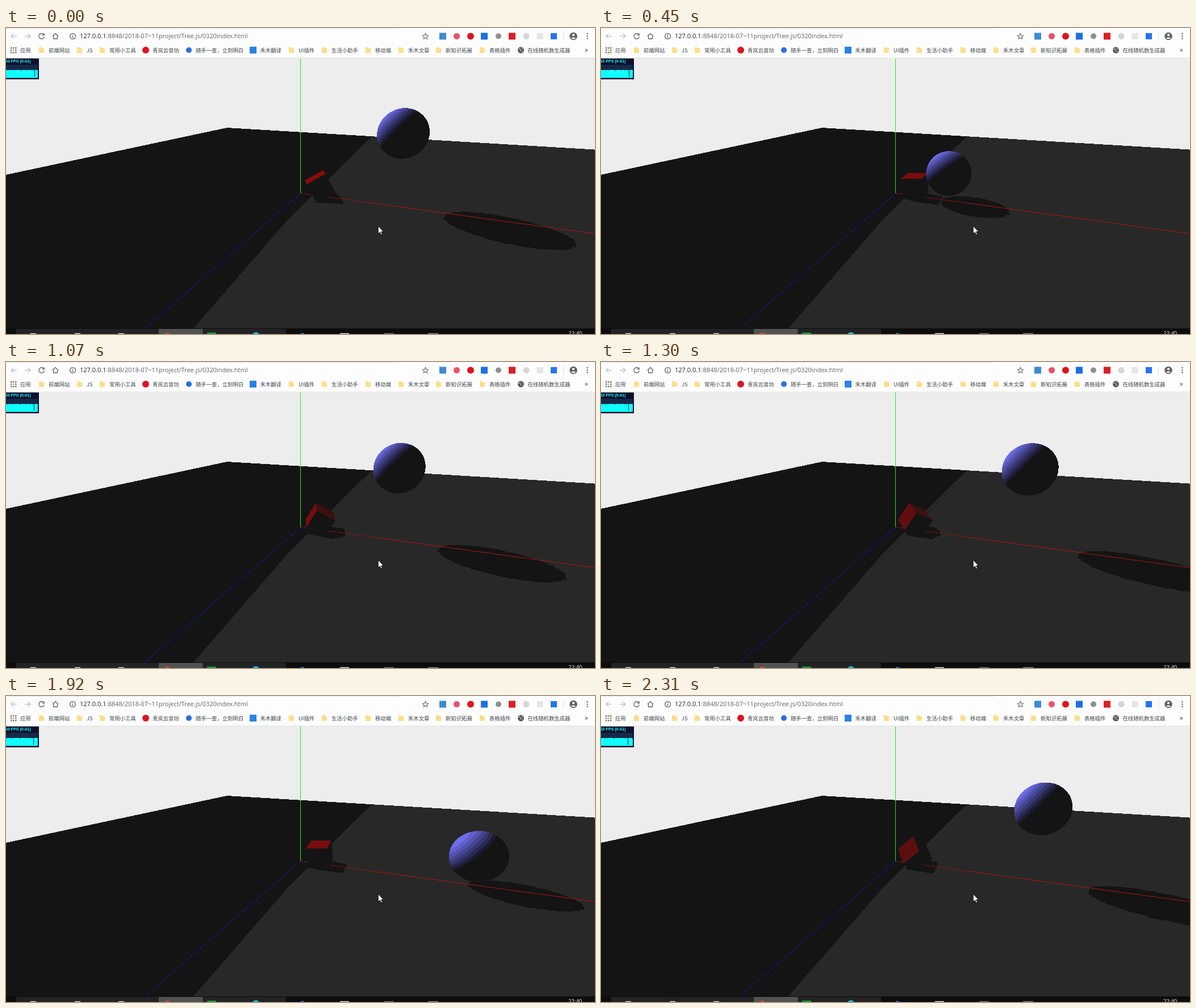
Animation of 1037 by 540 pixels, one loop 2380 ms. Source, as an HTML page:

```html
<!DOCTYPE html>
<html lang="zh">
<head>
<meta charset="utf-8">
<title>Bouncing sphere</title>
<style>
html, body { margin: 0; width: 100%; height: 100%; overflow: hidden; background: #ededed; }
svg { display: block; width: 1037px; height: 540px; }
text { white-space: pre; }
.url { font: 11px "Open Sans", "Noto Sans", sans-serif; fill: #5f6368; }
.mark { font: 9.35px "Noto Sans CJK SC", "Noto Sans CJK", "Noto Sans", sans-serif; fill: #3c4043; }
.fps { font: bold 7.2px "Liberation Sans", Arial, sans-serif; fill: #0ff; }
.clock { font: 9.5px "Open Sans", sans-serif; fill: #fff; }
.line { fill: none; stroke: #5f6368; stroke-width: 1.3; }
</style>
</head>
<body>
<svg id="stage" viewBox="0 0 1037 540">
  <rect width="1037" height="540" fill="#ededed"/>
  <g shape-rendering="crispEdges">
    <path d="M0 259L389 176L1037 214.6V540H0Z" fill="#141414"/>
    <path d="M644 191.2L541 293L499 335L330 530V540H1037V214.6Z" fill="#282828"/>
    <g id="shadows" fill="#141414"></g>
    <path d="M518.5 53V292" stroke="#14f014"/>
    <path d="M518.5 292L245 530" stroke="#15158c"/>
    <path d="M518.5 291.5L640 308.3" stroke="#a01010" stroke-dasharray="5 1.5"/>
    <path d="M640 308.3L1037 363" stroke="#b01212"/>
    <g id="cube"></g>
    <g id="ball"></g>
  </g>
  <path d="M655.3 349.5V363L658.4 360.2L660.6 365L662.6 364.1L660.5 359.4H664.6Z" fill="#fff" stroke="#000" stroke-width=".8"/>
  <g id="stats">
    <rect y="53" width="58" height="37.5" fill="#10102c"/>
    <rect y="65" width="56" height="23" fill="#15294a"/>
    <path id="graph" fill="#1ff"/>
    <text class="fps" x="-1.5" y="60.5">60 FPS (0-61)</text>
  </g>
  <g id="browser">
    <rect width="1037" height="53.5" fill="#fdfdfd"/>
    <rect width="692" height="1" fill="#e3e4e6"/>
    <path d="M0 53H1037" stroke="#dcdcdc"/>
    <path class="line" d="M19 14.5H9M13.5 10L9 14.5L13.5 19M33 14.5H43M38.5 10L43 14.5L38.5 19" style="stroke:#bfc1c4"/>
    <path class="line" d="M66.3 11.5A4.7 4.7 0 1 0 67.2 15.5M67.2 9.5V12.8H63.7"/>
    <path class="line" d="M82 14.5L87 9.7L92 14.5M83.5 14V19H90.5V14"/>
    <circle class="line" cx="117.5" cy="14.5" r="4.9"/>
    <path class="line" d="M117.5 13.5V17.5M117.5 11.3V12.5"/>
    <text class="url" x="130" y="18.3"><tspan fill="#202124">127.0.0.1</tspan>:8848/2018-07~11project/Tree.js/0320index.html</text>
    <path class="line" d="M738.5 9.5L740 13L743.6 13.3L740.9 15.7L741.7 19.2L738.5 17.3L735.3 19.2L736.1 15.7L733.4 13.3L737 13Z" style="stroke-width:1.1"/>
    <path d="M981.5 8V21" stroke="#dadce0"/>
    <circle cx="999" cy="14.5" r="6.8" fill="#5f6368"/>
    <circle cx="999" cy="12.4" r="2.1" fill="#fff"/>
    <path d="M994.8 18A5 3 0 0 1 1003.2 18A5 3 0 0 1 994.8 18" fill="#fff"/>
    <text class="mark" x="1018.5" y="43" style="font-size:13px">»</text>
  </g>
  <g id="taskbar">
    <rect y="530" width="1037" height="10" fill="#0d0d0d"/>
    <rect x="18" y="531" width="475" height="9" fill="#222324"/>
    <rect x="269" y="531" width="77.5" height="9" fill="#515252"/>
    <text class="clock" x="990" y="542">22:40</text>
  </g>
</svg>
<script>
const NS = 'http://www.w3.org/2000/svg', $ = id => document.getElementById(id);
function add(parent, tag, attrs, text) {
  const el = document.createElementNS(NS, tag);
  for (const k in attrs) el.setAttribute(k, attrs[k]);
  if (text) el.textContent = text;
  return parent.appendChild(el);
}
const bar = $('browser'), tasks = $('taskbar');
const disc = (p, cx, cy, r, fill) => add(p, 'circle', { cx, cy, r, fill });
const box = (p, x, y, width, height, fill) => add(p, 'rect', { x, y, width, height, fill });

// Browser bars
const folder = x => add(bar, 'path', { d: `M${x - 4.5} 34H${x}L${x + 1} 35.5H${x + 4.5}V44H${x - 4.5}Z`, fill: '#fbdf87' });
const label = (x, text) => add(bar, 'text', { class: 'mark', x, y: 42.7 }, text);
[[75, '前端网站'], [142, 'JS'], [182, '常用小工具'], [515, 'UI插件'], [573, '生活小助手'],
 [650, '移动端'], [708, '禾木文章'], [774, '新知识拓展'], [851, '表格插件']].forEach(([x, s]) => { folder(x - 12.5); label(x, s); });
[[25, '应用'], [258, '青岚云音坊'], [334, '随手一查，立刻明白'], [447.5, '禾木翻译'], [918.5, '在线随机数生成器']].forEach(([x, s]) => label(x, s));
const dots = ['#ea4335', '#fbbc05', '#34a853', '#4285f4'];
for (let i = 0; i < 9; i++) box(bar, 8 + i % 3 * 4, 34 + (i / 3 | 0) * 4, 2.5, 2.5, dots[(i * 2 + (i / 3 | 0)) % 4]);
disc(bar, 246, 39, 6, '#dd1520');
disc(bar, 322, 39, 5, '#2b6fe0');
box(bar, 429, 33, 12, 12, '#2a82e4');
disc(bar, 906.5, 39, 5.5, '#4d5156');
add(bar, 'path', { d: 'M902 38L905 36.5L907 39L905 41.5M908 35L910.5 37.5M908 42L910 40', stroke: '#fff', fill: 'none' });
box(bar, 763, 8.5, 12, 12, '#3c8bd0');
disc(bar, 793.5, 14.5, 5.5, '#e8516c');
disc(bar, 818, 14.5, 6, '#e0131b');
box(bar, 836, 8.5, 12, 12, '#1f6fe0');
disc(bar, 867, 14.5, 5, '#8b8f92');
box(bar, 885, 8.5, 12, 12, '#d92027');
disc(bar, 916, 14.5, 5.5, '#d5d5d5');
box(bar, 934.5, 9, 11, 11, '#e6e6e6');
box(bar, 959, 9, 11, 11, '#2474ee');
for (const y of [10.3, 14.5, 18.7]) disc(bar, 1023.5, y, 1.2, '#5f6368');

// Taskbar icons cut by the lower edge
for (const x of [43, 121, 198]) box(tasks, x, 538.7, 10, 2, '#e8e8e8');
disc(tasks, 284, 544, 6.5, '#d8473a');
box(tasks, 354, 537.5, 16, 3, '#1e9a3c');
disc(tasks, 440, 543.5, 6.8, '#27b6c4');
disc(tasks, 522, 543, 5, '#2374b8');
for (const [x, w, c] of [[588, 16, '#e4e4e4'], [666, 17, '#777'], [743, 18, '#888']]) box(tasks, x, 538.6, w, 2, c);

// Vectors
const dot = (a, b) => a[0] * b[0] + a[1] * b[1] + a[2] * b[2];
const mix = (a, b, k) => a.map((v, i) => v + b[i] * k);
const sub = (a, b) => mix(a, b, -1);
const unit = a => a.map(v => v / Math.hypot(...a));
const cross = (a, b) => [a[1] * b[2] - a[2] * b[1], a[2] * b[0] - a[0] * b[2], a[0] * b[1] - a[1] * b[0]];
const ring = (n, fn) => Array.from({ length: n }, (_, i) => fn(Math.cos(i / n * 2 * Math.PI), Math.sin(i / n * 2 * Math.PI)));

// A view is a point with its axes, aimed at the world's middle
function view(pos) {
  const ahead = unit(pos.map(v => -v)), right = unit(cross(ahead, [0, 1, 0]));
  return { pos, ahead, right, up: cross(right, ahead) };
}
const eye = view([20, 20, 50]), lamp = view([-40, 60, -10]);
function flat(v, p) {
  const q = sub(p, v.pos), z = dot(q, v.ahead);
  return [dot(q, v.right) / z, dot(q, v.up) / z];
}
const FOCUS = 511, R = 4, CUBE = [4, 2, 0], TEXEL = 2 * Math.sqrt(3) / 1024;
function screen(p) {
  const [x, y] = flat(eye, p);
  return (518.5 + FOCUS * x).toFixed(1) + ' ' + (291.5 - FOCUS * y).toFixed(1);
}
const outline = pts => 'M' + pts.map(screen).join('L') + 'Z';

// Shadow edges snap to the coarse shadow map, then fall on the floor
function cast(p) {
  const [x, y] = flat(lamp, p).map(v => Math.round(v / TEXEL) * TEXEL);
  const ray = mix(mix(lamp.ahead, lamp.right, x), lamp.up, y);
  return mix(lamp.pos, ray, -lamp.pos[1] / ray[1]);
}
const shadow = pts => outline(pts.map(cast));

function limb(p, from) {
  const v = sub(from, p), d = Math.hypot(...v), k = R / d;
  return { v: unit(v), k, w: Math.sqrt(1 - k * k) };
}
function basis(n) {
  const a = unit(cross(n, [0, 1, 0]));
  return [a, cross(n, a)];
}
function rim(p, from) {
  const { v, k, w } = limb(p, from), [a, b] = basis(v);
  return ring(240, (c, s) => mix(mix(mix(p, v, R * k), a, R * w * c), b, R * w * s));
}
// Visible part of the sphere where the light is stronger than u
function cap(p, u) {
  const { v, k, w } = limb(p, eye.pos), l = unit(sub(lamp.pos, p)), [a, b] = basis(l), q = Math.sqrt(1 - u * u);
  return ring(120, (c, s) => {
    let n = mix(mix(l.map(x => x * u), a, q * c), b, q * s);
    const h = dot(n, v);
    if (h < k) n = mix(v.map(x => x * k), unit(mix(n, v, -h)), w);
    return mix(p, n, R);
  });
}

function faces(r) {
  const c = Math.cos(r), s = Math.sin(r);
  const axes = [
    [c * c, c * s + s * s * c, s * s - c * c * s],
    [-c * s, c * c - s * s * s, s * c + c * s * s],
    [s, -s * c, c * c]
  ];
  return axes.flatMap((n, i) => [1, -1].map(g => {
    const a = axes[(i + 1) % 3], b = axes[(i + 2) % 3], mid = mix(CUBE, n, 2 * g);
    const pts = [[1, 1], [-1, 1], [-1, -1], [1, -1]].map(([x, y]) => mix(mix(mid, a, 2 * x), b, 2 * y * g));
    const toward = p => dot(unit(sub(p, mid)), n) * g;
    return { pts, seen: toward(eye.pos), lit: toward(lamp.pos) };
  }));
}
const split = pts => pts.flatMap((p, i) => Array.from({ length: 40 }, (_, j) => mix(p, sub(pts[(i + 1) % 4], p), j / 40)));

const ballShade = add($('shadows'), 'path'), cubeShade = add($('shadows'), 'path');
const sides = [0, 1, 2].map(() => add($('cube'), 'path'));
const body = add($('ball'), 'path', { fill: '#141414' });
const BANDS = 7;
const bands = Array.from({ length: BANDS }, (_, i) => {
  const k = (i + .6) / BANDS, c = Math.round(20 + 96 * k);
  return { u: .22 + .66 * i / (BANDS - 1), el: add($('ball'), 'path', { fill: `rgb(${c},${c - 1},${Math.round(34 + 212 * k)})` }) };
});

// Time: the picture is held between these moments
const LOOP = 2380;
const ticks = [0, 70, 150, 230, 300, 380, 450, 530, 600, 680, 750, 820, 900, 1070, 1130, 1180, 1240, 1300, 1370, 1450,
  1530, 1600, 1690, 1770, 1840, 1920, 2000, 2060, 2150, 2230, 2310];
const keys = [[0, 1.798], [450, 2.918], [820, 3.846], [1300, 4.958], [1600, 5.724], [1920, 6.478], [2310, 7.4]];
function phase(t) {
  let i = 0;
  while (i < keys.length - 2 && t >= keys[i + 1][0]) i++;
  const [t0, a] = keys[i], [t1, b] = keys[i + 1];
  return a + (b - a) * (t - t0) / (t1 - t0) + 2 * Math.PI;
}

function drawGraph(t) {
  const shift = [230, 1220, 2230].filter(x => t >= x).length;
  let d = '';
  for (let x = 0; x < 56; x++) {
    const id = x + shift, top = id === 50 ? 86 : id % 11 === 3 || id % 17 === 9 ? 75 : 74;
    d += `M${x} ${top}h1V88h-1Z`;
  }
  $('graph').setAttribute('d', d);
}

function draw(t) {
  const step = phase(t), p = [20 + 10 * Math.cos(step), 2.95 + 10 * Math.abs(Math.sin(step)), 0];
  ballShade.setAttribute('d', shadow(rim(p, lamp.pos)));
  body.setAttribute('d', outline(rim(p, eye.pos)));
  for (const { u, el } of bands) el.setAttribute('d', outline(cap(p, u)));

  const all = faces(step / 2), seen = all.filter(f => f.seen > 0);
  cubeShade.setAttribute('d', all.filter(f => f.lit > 0).map(f => shadow(split(f.pts))).join(''));
  sides.forEach((el, i) => {
    const f = seen[i];
    el.setAttribute('d', f ? outline(f.pts) : '');
    if (!f) return;
    const u = f.lit, g = Math.round(20 - 9 * u);
    el.setAttribute('fill', u < .16 ? '#141414' : `rgb(${Math.round(7 + 139 * u)},${g},${g})`);
  });
  drawGraph(t);
}

const start = performance.now();
let shown = -1;
function tick() {
  const t = (performance.now() - start) % LOOP, held = ticks.filter(x => x <= t).pop();
  if (held !== shown) draw(shown = held);
  requestAnimationFrame(tick);
}
tick();
</script>
</body>
</html>
```
